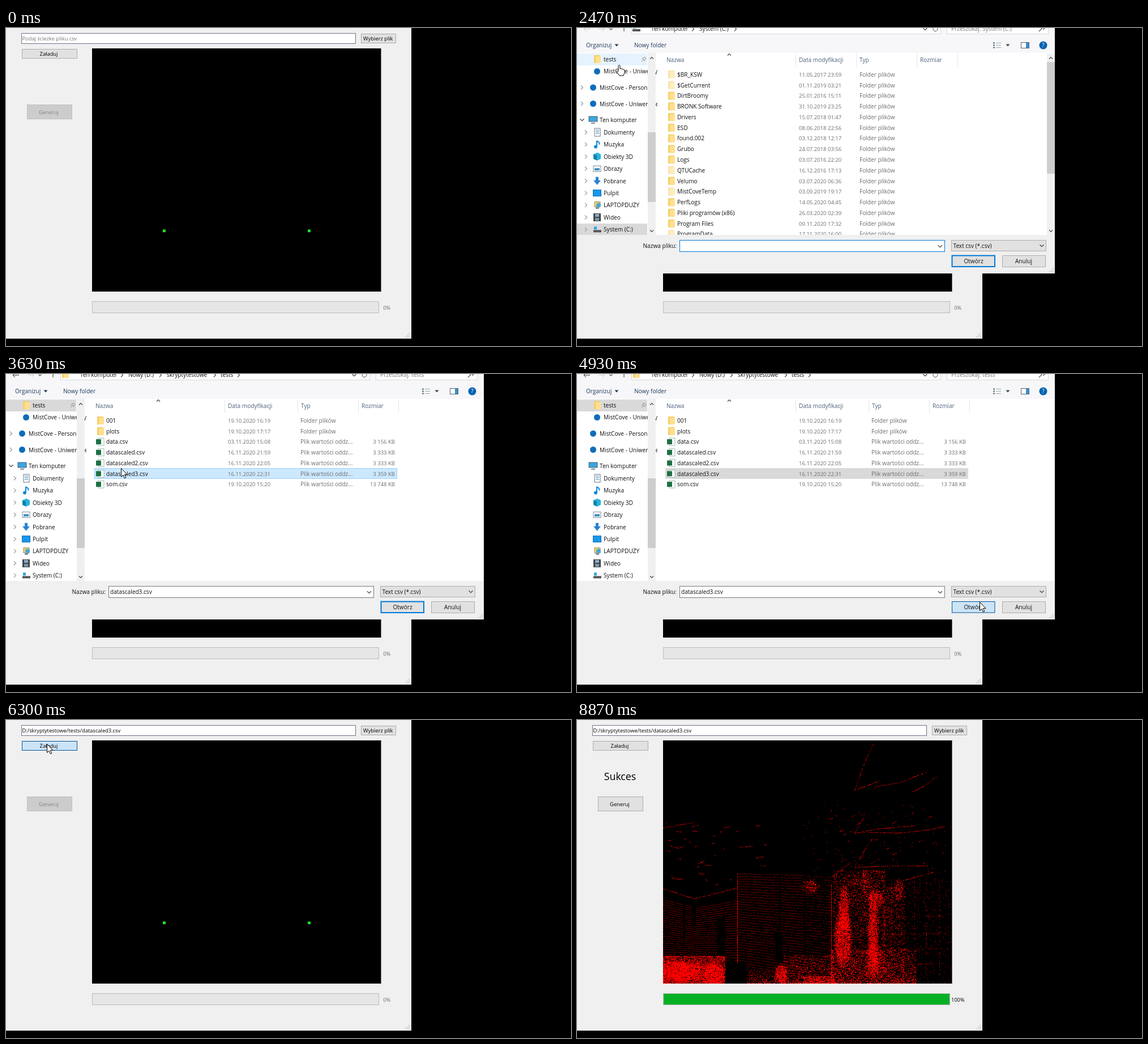
Animation of 998 by 561 pixels, one loop 8910 ms. Source, as an HTML page with a canvas:

```html
<!DOCTYPE html>
<html lang="pl">
<head>
<meta charset="utf-8">
<title>Wczytywanie pliku csv</title>
<style>
html, body { margin: 0; width: 998px; height: 561px; overflow: hidden; background: #000; }
svg, canvas { position: absolute; left: 0; top: 0; }
canvas { left: 152px; top: 36px; }
text { font: 10.1px "Open Sans", "Noto Sans", sans-serif; white-space: pre; }
.app { font-size: 9.3px; }
.num { font-size: 9.5px; }
.big { font-size: 17.8px; }
</style>
</head>
<body>
<svg id="win" width="998" height="561"></svg>
<canvas id="cloud" width="511" height="429"></canvas>
<svg id="dlg" width="998" height="561"></svg>
<svg id="top" width="998" height="561">
  <g id="cur" stroke="#000" stroke-linejoin="round">
    <path id="arrow" fill="#fff" d="M.5 .5V15.5L4 12.3L6.4 17.8L8.8 16.8L6.4 11.4H11Z"/>
    <path id="hand" fill="#fff" d="M0 1.5Q1.5 -1 3 1.5V7Q5 5.5 6 7.5Q8 6.3 8.7 8.3Q11 7.7 11 10V14L9 19H2L-3 12Q-3.5 9.5 0 11.5Z"/>
  </g>
</svg>
<script>
const LOOP = 8910;
const OPEN = 1960, PICK = 2760, SELECT = 3480, CLOSE = 5060;
const LOADED = 6720, RUN = 7300, DONE = 8200;
const $ = id => document.getElementById(id);

// ---- drawing helpers ----
const box = (x, y, w, h, fill, stroke, id = '') =>
  `<rect id="${id}" x="${x + .5}" y="${y + .5}" width="${w}" height="${h}" fill="${fill}" stroke="${stroke}"/>`;
const rect = (x, y, w, h, fill, more = '') =>
  `<rect x="${x}" y="${y}" width="${w}" height="${h}" fill="${fill}" ${more}/>`;
const path = (d, stroke = '#444', fill = 'none', w = 1) =>
  `<path d="${d}" stroke="${stroke}" fill="${fill}" stroke-width="${w}"/>`;
const txt = (x, y, s, fill = '#111', cls = '', anchor = 'start', id = '') =>
  `<text id="${id}" x="${x}" y="${y}" fill="${fill}" class="${cls}" text-anchor="${anchor}">${s}</text>`;
const down = (x, y, c = '#444', r = 3.5) => path(`M${x - r} ${y - r / 2}l${r} ${r}l${r} ${-r}`, c, 'none', 1.2);
const up = (x, y) => path(`M${x - 3} ${y + 1.5}l3 -3l3 3`, '#444', 'none', 1.2);
const right = (x, y, c = '#999') => path(`M${x - 2} ${y - 3.5}l3.5 3.5l-3.5 3.5`, c, 'none', 1.2);
const folder = (x, y, dim) => `<g opacity="${dim ? .55 : 1}">` +
  rect(x, y - 7, 11, 14, '#f5cf6b') + rect(x + 3, y - 5, 9, 12, '#ffe08c') + '</g>';

// ---- main window ----
const grip = (x, y) => [0, 1, 2].map(r => [...Array(r + 1).keys()]
  .map(c => rect(x - c * 3, y - (2 - r) * 3, 1.6, 1.6, '#bbb')).join('')).join('');
$('win').innerHTML =
  rect(0, 0, 716, 548, '#f0f0f0') +
  box(27, 9, 590, 18, '#fff', '#73738a') +
  txt(28.5, 22, '', '#777', 'app', 'start', 'file') +
  box(627, 10, 61, 16, '#e1e1e1', '#adadad', 'choose') +
  txt(657.3, 22, 'Wybierz plik', '#000', 'app', 'middle') +
  box(28, 37, 97, 16, '#e1e1e1', '#adadad', 'load') +
  txt(75.5, 49, 'Załaduj', '#000', 'app', 'middle') +
  txt(76, 106, 'Sukces', '#000', 'big', 'middle', 'ok') +
  box(37, 135, 79, 25, '#ccc', '#bfbfbf', 'gen') +
  txt(75.5, 151.5, 'Generuj', '#838383', 'app', 'middle', 'genText') +
  rect(152, 36, 510.5, 429, '#000') +
  `<g id="marks">${rect(277, 355.5, 5, 4.7, '#1ce81c') + rect(533, 355.5, 5, 4.7, '#1ce81c')}</g>` +
  box(152, 482, 506, 20, '#e6e6e6', '#bcbcbc') +
  rect(153, 483, 0, 19, '#06b025', 'id="bar"') +
  txt(672.8, 496.5, '0%', '#6d6d6d', 'app', 'middle', 'pct') +
  grip(711, 544);

// ---- file dialog ----
const diskRows = `$BR_KSW|11.05.2017 23:59
$GetCurrent|01.11.2019 03:21
DirtBroomy|25.01.2016 15:11
BRONK Software|31.10.2019 23:25
Drivers|15.07.2018 01:47
ESD|08.06.2018 22:56
found.002|03.12.2018 12:17
Grubo|24.07.2018 03:56
Logs|03.07.2016 22:20
QTUCache|16.12.2016 17:13
Velumo|03.07.2020 06:36
MistCoveTemp|03.09.2019 19:17
PerfLogs|14.05.2020 04:45
Pliki programów (x86)|26.03.2020 02:39
Program Files|09.11.2020 17:32
ProgramData|17.11.2020 16:00`.split('\n').map(r => r.split('|'));
const testRows = `001|19.10.2020 16:19
plots|19.10.2020 17:17
data.csv|03.11.2020 15:08|3 156 KB
datascaled.csv|16.11.2020 21:59|3 333 KB
datascaled2.csv|16.11.2020 22:05|3 333 KB
datascaled3.csv|16.11.2020 22:31|3 359 KB
som.csv|19.10.2020 15:20|13 748 KB`.split('\n').map(r => r.split('|'));

const sheet = (x, y) => rect(x + 4, y - 6.5, 10, 13, '#fff', 'stroke="#8aa898" stroke-width=".8"') +
  rect(x, y - 4.5, 9, 9, '#1d7145');
const fileRow = ([name, date, size], i, typeX) => {
  const y = 82 + i * 18.77, b = y + 3.8;
  return (size ? sheet(159, y) : folder(161, y, /^\$|Cache|Temp|Data$/.test(name))) +
    txt(177, b, name) + txt(392, b, date, '#6d6d6d', 'num') +
    txt(typeX, b, size ? 'Plik wartości oddz...' : 'Folder plików', '#6d6d6d') +
    (size ? txt(687, b, size, '#6d6d6d', 'num', 'end') : '');
};
const columns = xs => xs.map(x => rect(x, 45, 1, 23, '#e5e5e5')).join('') +
  txt(158, 60, 'Nazwa', '#4c607a') + txt(392, 60, 'Data modyfikacji', '#4c607a') +
  txt(xs[1] + 6, 60, 'Typ', '#4c607a') + txt(xs[2] + 6, 60, 'Rozmiar', '#4c607a') + up(269, 47);

const computer = (x, y) => rect(x, y - 6, 15, 9, '#3ca5e0', 'stroke="#345" stroke-width=".8"') + rect(x + 4, y + 5, 7, 1.5, '#567');
const drive = (x, y) => rect(x, y + 1, 14, 4, '#555') + rect(x + 1, y - 5, 5, 5, '#2ea3e6');
const icons = [
  y => rect(31, y - 7, 10, 14, '#fff', 'stroke="#678"') + path(`M33 ${y - 4}h6m-6 3h6m-6 3h6`, '#38a'),
  y => path(`M35 ${y - 7}v11M35 ${y - 6}q6 2 4 6`, '#1486d8', 'none', 2) + `<circle cx="33" cy="${y + 4}" r="3" fill="#1486d8"/>`,
  y => path(`M29 ${y - 4}l7 -3l6 3v8l-6 3l-7 -3Z`, 'none', '#28b4d8') + path(`M29 ${y - 4}l6 2v9l-6 -3Z`, 'none', '#0e83a8'),
  y => rect(29, y - 5, 13, 10, '#fff', 'stroke="#789"') + rect(31, y - 1, 9, 4, '#3b8fc0'),
  y => path(`M33 ${y - 7}h5v6h4l-6.5 8l-6.5 -8h4Z`, 'none', '#2783d4'),
  y => rect(28.5, y - 5.5, 14, 11, '#1797ea', 'stroke="#0c6fb8"'),
  y => rect(31, y - 6, 10, 9, '#f3d265', 'stroke="#987"') + `<circle cx="38" cy="${y}" r="4" fill="#4aa6d0"/>` + rect(33, y + 4, 6, 2, '#567'),
  y => rect(29, y - 7, 13, 14, '#444') + rect(32, y - 6, 7, 5, '#8ac') + rect(32, y + 1, 7, 5, '#79a'),
  y => drive(29, y)
];
const disc = (x, y) => `<circle cx="${x}" cy="${y}" r="5.5" fill="#0f6cbd"/>`;
const places = ['Dokumenty', 'Muzyka', 'Obiekty 3D', 'Obrazy', 'Pobrane', 'Pulpit', 'LAPTOPDUZY', 'Wideo', 'System (C:)'];
const placeY = i => 184 + i * 21.43;

const sidebar = rect(0, 44, 142, 322, '#fff') +
  rect(0, 45, 124, 21, '#d9d9d9', 'id="rowTests"') + rect(0, 345, 124, 21, '#d9d9d9', 'id="rowDisk"') +
  folder(30, 55) + txt(47, 59, 'tests') + path('M114 59l3 -3m-2 -3l5 5m-4 -4l3 -3l3 3l-3 3', '#888') +
  disc(35.5, 76.5) + txt(47, 80, 'MistCove - Uniwersytet') +
  disc(28.5, 105) + txt(40, 109, 'MistCove - Personal') +
  disc(28.5, 133.5) + txt(40, 137.5, 'MistCove - Uniwersytet') +
  computer(21, 162) + txt(40, 166, 'Ten komputer') +
  places.map((p, i) => icons[i](placeY(i)) + txt(47, placeY(i) + 3.8, p)).join('') +
  `<g id="chev">${right(9, 105) + right(9, 133.5) + down(9, 162) + places.map((p, i) => right(16, placeY(i))).join('')}</g>` +
  rect(125, 44, 14, 322, '#f0f0f0') + rect(125, 184, 14, 123, '#cdcdcd') + up(132, 53) + down(132, 358, '#444', 3);

const crumb = (x, s) => txt(x, 5, s);
const diskView = '<g id="disk">' + drive(98, 1) +
  crumb(216, 'System (C:)') + right(280, 2, '#555') + txt(661, 5, 'Przeszukaj: System (C:)', '#777') +
  path('M23 2H12l4 -4m-4 4l4 4M38 2h11l-4 -4m4 4l-4 4', '#ccc') +
  columns([386, 493, 600, 672]) + diskRows.map((r, i) => fileRow(r, i, 499)).join('') +
  rect(830, 45, 14, 321, '#f0f0f0') + rect(830, 60, 14, 197, '#cdcdcd') + up(837, 53) + down(837, 358, '#444', 3) + '</g>';
const testView = '<g id="tests">' + folder(99, 0) +
  crumb(216, 'Nowy (D:)') + right(273, 2, '#555') + crumb(284, 'skryptytestowe') + right(369, 2, '#555') +
  crumb(379, 'tests') + right(411, 2, '#555') + txt(661, 5, 'Przeszukaj: tests', '#777') +
  path('M23 2H12l4 -4m-4 4l4 4', '#333') + path('M38 2h11l-4 -4m4 4l-4 4', '#ccc') +
  box(156, 166, 534, 18, '#cce8ff', '#99d1ff', 'sel') +
  columns([386, 515, 622, 693]) + testRows.map((r, i) => fileRow(r, i, 520)).join('') + '</g>';

$('dlg').innerHTML =
  rect(0, 0, 844, 433, '#f0f0f0') + rect(0, 0, 844, 44, '#f7f7f9') +
  box(96, -9, 546, 19, '#fff', '#d9d9d9') + box(653, -9, 179, 19, '#fff', '#d9d9d9') +
  crumb(131, 'Ten komputer') + right(205, 2, '#555') + down(60, 2, '#555', 2.5) + path('M83 6v-8', '#333') +
  down(615, 2) + path('M630 -1a4 4 0 1 0 6 0', '#555') + path('M816 6l5 -5a3 3 0 1 1 2 1', '#555', 'none', 1.3) +
  txt(16, 34, 'Organizuj', '#1e395b') + path('M66.5 28.5h7l-3.5 4Z', 'none', '#1e395b') + txt(101, 34, 'Nowy folder', '#1e395b') +
  path('M735 26.5h3m-3 4h3m-3 4h3', '#567', 'none', 2) + path('M740 26.5h9m-9 4h9m-9 4h9', '#9aa') +
  path('M757.5 28.5h7l-3.5 4Z', 'none', '#444') + box(784, 25, 14, 10, '#fff', '#567') + rect(793, 26, 5, 9, '#3c8fcc') +
  '<circle cx="823.5" cy="30.5" r="7" fill="#0063b1"/>' + txt(823.5, 34.3, '?', '#fff', '', 'middle') +
  sidebar + rect(142, 44, 702, 322, '#fff') + diskView + testView + rect(0, 365, 844, 68, '#f0f0f0') +
  txt(176, 388, 'Nazwa pliku:', '#111', '', 'end') +
  box(181, 374, 468, 20, '#fff', '#0078d7', 'nameBox') + txt(184, 388.3, '', '#111', '', 'start', 'name') + down(641.5, 385) +
  box(661, 374, 167, 19, '#e1e1e1', '#adadad') + txt(664.5, 388, 'Text csv (*.csv)') + down(821, 384) +
  `<rect id="openBtn" x="662.5" y="401.5" width="75.5" height="19.5"/>` + txt(700.5, 415, 'Otwórz', '#111', '', 'middle') +
  box(751, 401, 76, 20, '#e1e1e1', '#adadad') + txt(789, 415, 'Anuluj', '#111', '', 'middle') + grip(840, 429);

// ---- point cloud ----
let seed = 7;
const rnd = () => {
  seed = seed + 0x6D2B79F5 | 0;
  let n = Math.imul(seed ^ seed >>> 15, 1 | seed);
  n = n + Math.imul(n ^ n >>> 7, 61 | n) ^ n;
  return ((n ^ n >>> 14) >>> 0) / 4294967296;
};
const mix = (a, b, u) => a + (b - a) * u;
const ctx = $('cloud').getContext('2d');
ctx.translate(-152, -36);
ctx.fillStyle = '#f00';
const dot = (x, y, a = 1) => { ctx.globalAlpha = a; ctx.fillRect(Math.floor(x), Math.floor(y), 1, 1); };

// shadows: centre and half size
const holes = [[254, 380, 7, 34], [356, 400, 7, 26], [290, 445, 9, 20], [206, 345, 3, 20], [189, 355, 3, 30], [358, 320, 2, 50], [401, 350, 2, 70], [270, 445, 8, 22], [318, 455, 7, 10]];
const inHole = (x, y) => holes.some(([cx, cy, w, h]) => Math.abs(x - cx) < w && Math.abs(y - cy) < h);

function wall(x0, x1, t0, t1, b0, b1, rows, keep) {
  for (let r = 0; r <= rows; r++)
    for (let x = x0; x < x1; x += 2) {
      const u = (x - x0) / (x1 - x0);
      const y = mix(mix(t0, t1, u), mix(b0, b1, u), r / rows);
      if (rnd() < keep && !inHole(x, y)) dot(x, y + rnd() * .6, .75);
    }
}
function scatter(x0, x1, y0, y1, n, px = 1, py = 1, a = 1) {
  while (n--) dot(mix(x0, x1, rnd() ** px), mix(y1, y0, rnd() ** py), a);
}
function blob(cx, cy, rx, ry, n) {
  while (n--) {
    const a = rnd() * 2 * Math.PI, r = Math.sqrt(rnd()) * (.7 + rnd() * .5);
    dot(cx + Math.cos(a) * r * rx, cy + Math.sin(a) * r * ry);
  }
}
function line(pts, keep = .7) {
  for (let i = 2; i < pts.length; i += 2) {
    const [x0, y0, x1, y1] = pts.slice(i - 2, i + 2), n = Math.hypot(x1 - x0, y1 - y0);
    for (let k = 0; k < n; k++) if (rnd() < keep) dot(mix(x0, x1, k / n), mix(y0, y1, k / n) + rnd(), .85);
  }
}
wall(152, 210, 317, 331, 417, 418, 25, .85);
wall(210, 283, 332, 319, 419, 424, 24, .85);
wall(283, 400, 271, 274, 432, 450, 36, .82);
wall(400, 450, 275, 278, 450, 458, 37, .55);
line([283, 271, 283, 430], .8);
line([449, 290, 449, 460], .9);
[[490, 124, 512, 65], [490, 124, 534, 107], [525, 118, 570, 110, 618, 91], [592, 127, 612, 117],
 [490, 200, 508, 169], [490, 200, 530, 192, 598, 186], [515, 198, 570, 199, 625, 193, 650, 187],
 [490, 260, 508, 229], [490, 260, 555, 257, 620, 257], [450, 277, 483, 251], [570, 285, 630, 268],
 [152, 297, 208, 315, 283, 296], [152, 190, 208, 180], [166, 222, 179, 226, 190, 222]
].forEach(p => line(p, .62));
line([512, 65, 525, 40], .3);
line([612, 117, 642, 95], .3);
line([508, 229, 522, 208], .35);
for (let i = 0; i < 36; i++) {
  const x = mix(155, 345, rnd() ** 1.3), y = mix(178, 292, rnd());
  line([x, y, x + 3 + rnd() * 11, y + rnd() * 5 - 3], .6);
}
for (let i = 0; i < 18; i++) {
  const x = mix(440, 640, rnd()), y = mix(155, 265, rnd());
  line([x, y, x + 8, y - 3], .5);
}
scatter(400, 650, 150, 270, 110);
scatter(152, 262, 416, 465, 4200, 1.2, 1.1);
blob(186, 444, 36, 18, 2600);
blob(241, 450, 18, 23, 1800);
blob(361, 450, 11, 18, 700);
scatter(365, 450, 415, 465, 900, 1, 1.6);
scatter(400, 455, 452, 465, 500);
scatter(300, 350, 440, 465, 220, 1, 1.5);
blob(413, 294, 15, 12, 170);
blob(472, 335, 9, 45, 900);
blob(470, 385, 15, 48, 2100);
blob(527, 315, 13, 15, 380);
blob(523, 370, 9, 65, 1600);
blob(524, 425, 14, 34, 1000);
blob(509, 285, 5, 22, 130);
blob(568, 300, 9, 18, 150);
scatter(452, 545, 265, 465, 2300, 1, .75);
scatter(450, 600, 405, 465, 2200, 1.3, 1.4);
scatter(540, 580, 290, 465, 650);
scatter(540, 662, 280, 465, 620, 1.5, 1, .7);
[555, 596, 617, 640].forEach(x => line([x, 285, x, 450], .2));
[347, 378, 405, 431].forEach(y => line([540, y, 655, y - 2], .25));

// ---- motion ----
// time, x, y of the pointer tip
const track = [[300, 470, 548], [900, 560, 260], [1230, 655, 18], [1360, 655, 18], [1780, 60, 192], [2000, 60, 192],
  [2400, 73, 65], [2740, 73, 65], [3400, 203, 166], [3680, 203, 166], [4300, 720, 424], [4600, 711, 402], [5080, 711, 402],
  [5400, 650, 20], [6080, 72, 42], [6500, 72, 42], [6960, 78, 148], [7260, 78, 148], [8050, 420, -25]];
const ease = u => u * u * (3 - 2 * u);
function pointer(t) {
  const i = track.findIndex(k => k[0] > t);
  if (i < 1) return null;
  const [a, b] = [track[i - 1], track[i]], u = ease((t - a[0]) / (b[0] - a[0]));
  return [mix(a[1], b[1], u), mix(a[2], b[2], u)];
}
const show = (id, on) => $(id).style.display = on ? '' : 'none';
const set = (id, attrs) => { for (const k in attrs) $(id).setAttribute(k, attrs[k]); };
const between = (t, a, b) => t >= a && t < b;
const looks = {
  idle: { fill: '#e1e1e1', stroke: '#adadad' }, focus: { fill: '#e1e1e1', stroke: '#5f93c4' },
  hover: { fill: '#e5f1fb', stroke: '#0078d7' }, press: { fill: '#cce4f7', stroke: '#005499' },
  off: { fill: '#ccc', stroke: '#bfbfbf' }
};
function look(id, p, pressed, rest = 'idle') {
  const b = $(id), at = k => +b.getAttribute(k);
  const over = p && p[0] > at('x') && p[0] < at('x') + at('width') && p[1] > at('y') && p[1] < at('y') + at('height');
  set(id, looks[pressed ? 'press' : over ? 'hover' : rest]);
}

function draw(t) {
  const p = pointer(t), dialog = between(t, OPEN, CLOSE), loaded = t >= LOADED;
  show('cur', p);
  if (p) set('cur', { transform: `translate(${Math.round(p[0])} ${Math.round(p[1])})` });
  const hand = between(t, 2200, 2800);
  show('hand', hand);
  show('arrow', !hand);

  $('file').textContent = t < CLOSE ? 'Podaj ścieżke pliku csv' : 'D:/skryptytestowe/tests/datascaled3.csv';
  set('file', { fill: t < CLOSE ? '#777' : '#000' });
  look('choose', p, between(t, 1260, 1360), between(t, 1360, CLOSE) ? 'focus' : 'idle');
  look('load', p, between(t, 6240, 6420));
  look('gen', loaded ? p : null, between(t, 7080, 7260), loaded ? 'idle' : 'off');
  set('genText', { fill: loaded ? '#000' : '#838383' });
  show('ok', loaded);

  const done = Math.max(0, Math.min(1, (t - RUN) / (DONE - RUN)));
  set('bar', { width: 505 * done });
  $('pct').textContent = Math.round(done * 100) + '%';
  set('pct', { fill: done ? '#000' : '#6d6d6d' });
  show('cloud', t >= DONE);
  show('marks', t < DONE);

  show('dlg', dialog);
  if (!dialog) return;
  const inTests = t >= PICK, picked = t >= SELECT, moved = t >= 4350;
  show('disk', !inTests);
  show('tests', inTests);
  show('rowDisk', !inTests);
  set('rowTests', { fill: inTests ? '#d9d9d9' : hand ? '#e5f3ff' : '#fff' });
  show('chev', t < 3900);
  show('sel', picked);
  set('sel', moved ? { fill: '#d9d9d9', stroke: '#d9d9d9' } : { fill: '#cce8ff', stroke: '#99d1ff' });
  $('name').textContent = picked ? 'datascaled3.csv' : '';
  set('nameBox', { stroke: inTests ? '#7a7a7a' : '#0078d7' });
  look('openBtn', p, between(t, 4850, CLOSE));
  if (t < 4850) set('openBtn', { stroke: '#0078d7' });
  set('openBtn', { 'stroke-width': t < 4850 ? 2 : 1 });
}
function tick() {
  draw(performance.now() % LOOP);
  requestAnimationFrame(tick);
}
tick();
</script>
</body>
</html>
```
